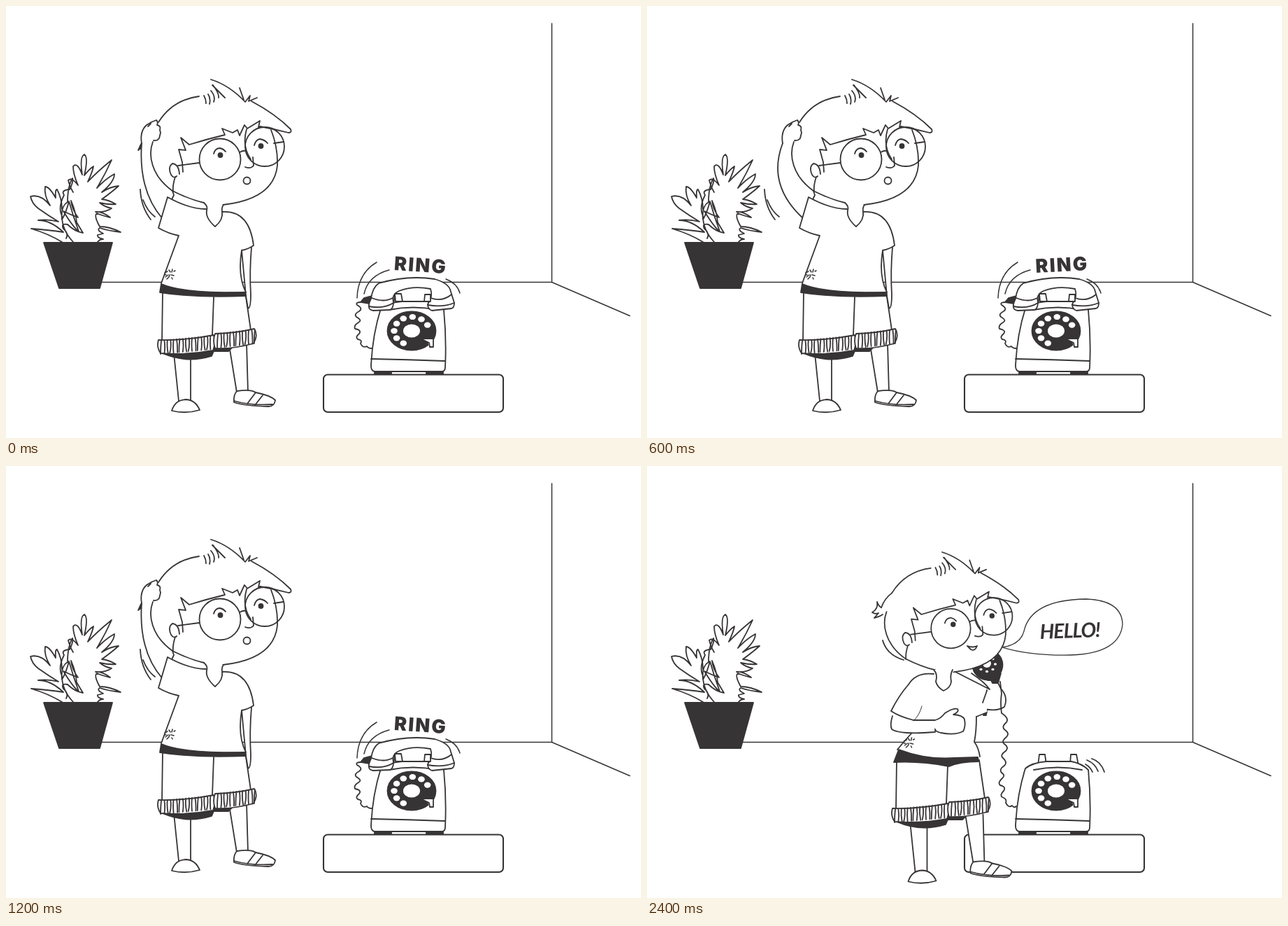
An HTML page that plays this animation: 908x617 px, repeating every 4400 ms.

```html
<!DOCTYPE html>
<html lang="en">
<head>
<meta charset="utf-8">
<title>Answering the phone</title>
<style>
html, body { margin: 0; width: 100%; height: 100%; overflow: hidden; background: #fff; }
svg { display: block; width: 908px; height: 617px; }
path, line, rect, circle, ellipse { fill: none; stroke: #373435; stroke-width: 1.8; stroke-linecap: round; stroke-linejoin: round; }
.w { fill: #fff; }
.k { fill: #373435; }
.hole { fill: #fff; stroke: none; }
.blank { fill: #fff; stroke: none; }
.thin path, path.thin { stroke-width: 1.5; }
text { fill: #373435; }
</style>
</head>
<body>
<svg viewBox="0 0 908 617">
<defs>
  <g id="head">
    <path class="blank" d="M218 166Q238 134 276 129L300 115 345 134 408 177 386 185 388 228Q383 276 310 284L283 281Q262 276 238 264C207 242 203 212 210 194Z"/>
    <path d="M218 166Q238 134 276 129M283 128Q286 133 286 139M289 126Q293 132 291 140M293 121Q300 129 297 137M296 113Q305 125 304 131M293 105Q319 113 341 136M295 113L313 131M334 117L340 134M342 137L349 128 347 136 359 131"/>
    <path d="M351 136Q385 154 407 176Q409 181 404 181Q385 176 363 172L361 173 363 164 345 175 341 170 334 185 331 177 324 181 309 175 313 184Q288 190 262 198L250 188 257 206 247 205 252 223 253 237"/>
    <path d="M210 194C203 212 207 242 238 264Q262 276 283 281M248 240Q247 226 238 225Q231 230 236 241Q240 247 244 243M242 244Q238 256 239 265"/>
    <path d="M379 177Q389 202 388 228Q383 276 310 284M344 176Q337 200 350 219M353 216L354 228Q350 233 342 230"/>
    <circle cx="306" cy="219" r="29.5"/><circle cx="370" cy="201" r="28"/>
    <path d="M334 209Q339 206 343 207M246 228L276 224M383 196L397 194M297 211Q299 203 306 203Q311 204 314 208M355 199Q357 191 363 190Q370 191 374 196"/>
  </g>
  <g id="eyes"><circle class="k" cx="306.500" cy="213" r="3"/><circle class="k" cx="364.500" cy="200" r="3"/></g>

  <g id="legs">
    <path class="w" d="M240 496L247 564H264V500"/>
    <path class="w" d="M319 484L330 552H346L344 482"/>
    <path class="w" d="M237 578Q242 562 258 562Q271 563 277 577Q257 583 237 578Z"/>
    <path class="w" d="M330 550Q350 547 357 552Q378 556 385 563Q384 572 375 572Q340 571 326 566Q325 556 330 550Z"/>
    <path d="M326 564Q350 571 381 569M357 552L345 568M367 556L356 570"/>
  </g>
  <g id="shorts">
    <path class="k" d="M224 496Q258 511 294 500L297 493 318 493 324 487 298 486Z"/>
    <path class="w" d="M224 408L223 480 296 472 350 463 342 408Z"/>
    <path d="M297 416L295 470"/>
    <path class="w" d="M218 477Q215 487 221 496Q260 499 296 492Q300 482 297 470Q255 478 218 477Z"/>
    <path class="w" d="M299 468Q330 467 355 461Q361 470 354 482Q325 490 299 489Q295 478 299 468Z"/>
    <path id="hatch"/>
  </g>
  <g id="badge" class="thin"><path d="M227 381l4-2M228 387l4-3M233 377l2 3M238 376l-1 4M230 390l3-3M236 384l4 1M234 384l-1 3M240 379l2-1M237 388l1 2M227 384h2"/></g>

  <g id="phone">
    <rect class="k" x="532" y="518" width="24" height="8"/><rect class="k" x="606" y="518" width="24" height="8"/>
    <path class="w" d="M559 428L561 412H569L571 426M605 426L606 412H614L617 428"/>
    <path class="w" d="M541 432Q550 424 571 422H607Q622 425 631 434Q635 476 633 516Q633 522 628 522H532Q527 521 527 514Q529 470 541 432Z"/>
    <path d="M527 504Q580 505 633 507M553 434Q587 427 622 434"/>
    <ellipse class="k" cx="585" cy="464" rx="34.5" ry="27.5"/>
    <ellipse class="hole" cx="585" cy="464" rx="12" ry="9.5"/>
    <g id="holes"></g>
    <path class="hole" d="M608 479H617L624 474V490H611Z"/>
    <path class="w" d="M602 475H616V487H611L610 481 602 477"/>
  </g>
  <g id="buzz"><path d="M636 418Q649 422 654 437M629 420Q641 425 645 436M627 426Q634 430 637 437"/></g>
  <path id="cord" d="M507 438Q513 442 508 446Q501 452 505 456Q514 458 510 464Q504 470 508 473Q515 475 513 481Q517 489 522 485Q525 489 528 486"/>
</defs>

<rect class="blank" width="908" height="617"/>
<path class="thin" d="M780.5 25V394.5L892 442.5M135 394.5H780.5"/>

<path d="M131 337Q134 333 139 333Q130 331 131 327L139 325Q129 320 134 317Q146 321 164 323Q148 315 134 315Q125 299 130 296Q136 299 149 302Q137 293 128 294Q142 295 151 289Q141 287 134 281Q147 284 157 283Q147 277 137 276Q151 266 161 257Q149 258 137 266Q155 251 155 240Q142 247 130 260Q142 240 151 220Q130 237 117 251Q124 236 125 229Q119 233 112 242Q118 216 112 212Q105 215 109 241Q102 222 96 229Q96 240 103 256Q94 244 89 249Q92 260 96 266"/>
<path d="M80 337Q60 325 36 318Q62 320 82 323Q64 306 46 306Q60 304 75 308Q60 299 46 289Q37 282 35 272Q50 268 63 285Q54 270 56 258Q62 258 71 274Q70 262 73 262Q80 275 80 290"/>
<path d="M96 337Q80 320 80 300Q74 288 83 270Q78 263 91 262Q97 250 95 246Q88 258 88 280Q78 286 80 305Q86 295 90 279Q96 300 104 322Q96 316 82 293Q92 298 103 302Q94 290 93 278Q100 294 101 309L110 324Q98 322 88 312Q78 310 82 318Q90 325 86 332"/>
<path class="k" d="M54 338H152L134 403H76Z"/>

<rect class="w" x="454" y="526.500" width="257" height="53.500" rx="6" style="stroke-width:2.1"/>

<g id="waiting">
  <use href="#legs"/><use href="#shorts"/>
  <path class="w" d="M351 345Q348 380 350 412Q350 432 346 432L343 414 337 349"/>
  <path id="arm" class="w"/>
  <path class="blank" d="M231 273Q262 291 286 290L310 294Q345 290 354 342L337 349Q332 385 343 408Q260 412 222 396L247 328 218 317Z"/>
  <path class="k" d="M222 397Q255 411 342 409L343 414Q270 417 220 409Z"/>
  <path d="M310 294Q348 292 354 342Q347 347 337 349Q331 385 343 409M231 273L218 317Q232 325 247 328L222 396M231 273Q262 290 286 290"/>
  <use href="#badge"/>
  <use href="#head"/><use href="#eyes"/>
  <circle cx="344.500" cy="249.500" r="5"/>
  <path class="w" d="M283 281Q289 286 287 292Q285 303 299 315Q311 305 309 294Q308 288 311 284"/>
  <path class="w" d="M194 196Q191 179 201 170Q208 165 215 163Q218 166 216 170Q222 171 220 177L221 181 219 189Q216 193 211 192"/>
  <path d="M203 172L207 168"/>
  <path id="thumb" class="k" d="M193 197L189 206 193 203Z"/>
  <path id="swish" d="M192 262Q193 287 207 305M196 277Q202 293 213 301"/>

  <g id="shake">
    <use href="#phone"/>
    <g transform="translate(5)">
      <path class="k" d="M507 423L512 417 523 414 520 425Z"/>
      <path d="M508 423Q499 423 502 427Q511 432 505 436Q497 440 501 444Q510 449 504 452Q497 456 499 461Q509 463 505 468Q499 473 503 476Q510 477 507 482Q510 489 516 486Q518 489 523 489"/>
      <path class="w" d="M519 430Q518 426 522 418Q524 402 533 396Q575 384 613 390Q634 396 636 408L641 424Q641 431 637 432L609 435Q603 433 603 426Q611 415 607 404Q582 399 562 407Q551 412 554 423Q554 432 549 434L525 435Q519 434 519 430Z"/>
      <path class="w" d="M556 411H565L567 422H598L599 412H607V422H557Z"/>
      <path d="M523 417Q540 424 553 417M519 429Q540 433 554 424M607 417Q624 423 637 412M603 427Q624 431 641 424"/>
    </g>
  </g>
  <path class="thin" d="M502 417Q503 382 530 366M512 411Q518 385 548 377M629 390Q645 396 649 410"/>
  <text id="ring" style="font:900 27px Inter,sans-serif;letter-spacing:2.2px">RING</text>
</g>

<g id="answering">
  <use href="#phone"/><use href="#buzz"/><use href="#cord"/>
  <g transform="translate(136.500 15.500)"><use href="#legs"/></g>
  <g transform="translate(133 12)"><use href="#shorts"/></g>

  <g id="reach">
    <path d="M519 412Q504 414 505 420Q516 424 511 429Q503 433 507 438"/>
    <path class="w" d="M493 342Q500 358 510 358Q550 356 572 346Q585 339 591 341L575 364Q540 378 512 382Q485 380 470 361"/>
    <path class="k" d="M512 411L522 396 526 399 523 410Z"/>
    <path class="w" d="M523 411Q528 380 540 368Q570 350 606 346Q628 344 634 359L639 371Q638 378 630 380L611 387Q604 385 607 378Q610 366 604 361Q590 365 566 378Q549 383 553 390L558 396Q558 405 553 409L531 417Q524 418 523 411Z"/>
    <path d="M526 403Q548 403 555 393M606 378Q628 376 635 362"/>
    <path class="w" d="M566 364Q565 357 574 359Q580 352 586 356Q594 353 595 360Q602 364 598 370Q596 376 588 373Q582 381 576 375Q565 379 565 372Z"/>
  </g>
  <g id="talk">
    <path class="w" d="M486 320Q477 346 482 347Q500 351 511 344Q517 330 506 318L500 306 487 306"/>
    <path d="M505 308L507 325Q505 338 507 353Q518 360 514 366Q506 373 512 377Q519 382 514 387Q506 393 511 397Q518 402 513 407Q504 413 509 417Q516 423 511 428Q503 433 507 438"/>
    <path class="k" d="M483 348H486L485 356H481Z"/>
    <path class="k" d="M490 302L494 310H502L506 296Z"/>
    <circle class="k" cx="487" cy="284" r="21.500"/>
    <circle class="hole" cx="486" cy="282" r="6"/>
    <g id="dots"></g>
  </g>

  <path class="blank" d="M410 297Q385 294 374 312Q360 328 349 350L379 363 378 384 358 405Q395 420 476 415L468 394 471 358 486 352 486 322 437 297Z"/>
  <path class="k" d="M360 405Q400 420 440 417L473 416 474 422Q447 422 432 429Q390 421 353 423Z"/>
  <path class="w" d="M351 357Q347 370 350 376Q362 384 412 380L414 363H381"/>
  <path d="M410 297Q385 294 374 312Q360 328 349 350Q361 358 381 363M378 382Q367 394 358 405M471 358Q471 380 468 394Q474 402 476 415"/>
  <path style="stroke-width:1" d="M393 343Q390 355 382 363"/>
  <path id="sleeve"/>
  <path class="w" d="M412 363Q420 361 426 353Q438 345 444 347Q447 351 438 355Q452 356 454 362Q456 372 452 379Q440 385 420 381Q412 379 412 376"/>
  <g transform="translate(140.500 12)"><use href="#badge"/></g>

  <g transform="translate(141.600 22.500) scale(.957)">
    <use href="#head"/><use id="gaze" href="#eyes"/>
    <path d="M218 166Q207 174 202 188"/>
  </g>
  <path d="M335 202Q331 200 329 194Q331 204 322 209Q326 212 331 210L325 217Q331 216 337 212"/>
  <path d="M337 249Q343 270 367 277"/>
  <path id="mouth"/>
  <path class="w" d="M410 291Q416 297 413 308Q415 316 424 321Q434 317 435 308Q433 298 437 291"/>
  <g id="hello">
    <path class="w" style="stroke-width:1.300" d="M508 259Q534 255 539 236Q549 191 628 190Q679 192 680 226Q676 268 605 270Q548 271 508 259Z"/>
    <text transform="translate(562 247) rotate(-2)" style="font:italic 700 29px Lato,sans-serif;letter-spacing:-1.2px">HELLO!</text>
  </g>
</g>
</svg>
<script>
const $ = id => document.getElementById(id);
const show = (id, on) => $(id).style.display = on ? '' : 'none';
const set = (id, name, value) => $(id).setAttribute(name, value);

function stripes(x0, x1, top0, top1, height) {
  let d = '';
  for (let x = x0, i = 0; x < x1; x += 4.4, i++) {
    const y = top0 + (top1 - top0) * (x - x0) / (x1 - x0);
    d += `M${x} ${y}q${i % 2 ? 1.5 : -1} ${height / 2} ${i % 3 - 1} ${height}`;
  }
  return d;
}
function ring(id, n, cx, cy, rx, ry, size, from, step) {
  let dots = '';
  for (let i = 0; i < n; i++) {
    const a = (from + i * step) * Math.PI / 180;
    dots += `<ellipse class="hole" cx="${cx + rx * Math.cos(a)}" cy="${cy + ry * Math.sin(a)}" rx="${size}" ry="${size * .85}"/>`;
  }
  $(id).innerHTML = dots;
}
set('hatch', 'd', stripes(222, 296, 478, 471, 19) + stripes(303, 356, 468, 462, 20));
ring('holes', 8, 585, 464, 25, 20, 4.8, 118, 31);
ring('dots', 8, 486, 283, 12, 10.5, 2.1, 0, 45);

function draw(now) {
  const t = now % 4400;
  const swing = t < 1200 && Math.floor(t / 200) % 2 === 1;
  const talking = t >= 1900;
  show('waiting', t < 1400);
  show('answering', t >= 1400);
  show('reach', !talking);
  show('talk', talking);
  show('hello', t >= 2400);

  set('arm', 'd', swing ? 'M194 196Q171 256 224 304L240 270 213 192' : 'M194 196Q189 264 224 304L240 270 213 192');
  set('swish', 'transform', `translate(${swing ? -24 : 0})`);
  show('thumb', !swing);
  set('shake', 'transform', `translate(${swing ? 0 : -5})`);
  set('ring', 'transform', swing ? 'translate(556 381) rotate(-3)' : 'translate(554.5 377) rotate(4)');

  set('sleeve', 'd', talking
    ? 'M437 292L490 319Q483 309 464 296M486 321L480 338M486 352L471 358'
    : 'M437 292Q468 297 494 342Q484 353 471 362');
  set('sleeve', 'class', talking ? '' : 'w');
  set('gaze', 'transform', `translate(${talking ? 3 : 0})`);
  set('mouth', 'd', talking ? 'M458 257Q466 260 472 257Q469 265 463 262Z' : 'M459 257Q466 264 472 257');
  requestAnimationFrame(draw);
}
draw(performance.now());
</script>
</body>
</html>
```
